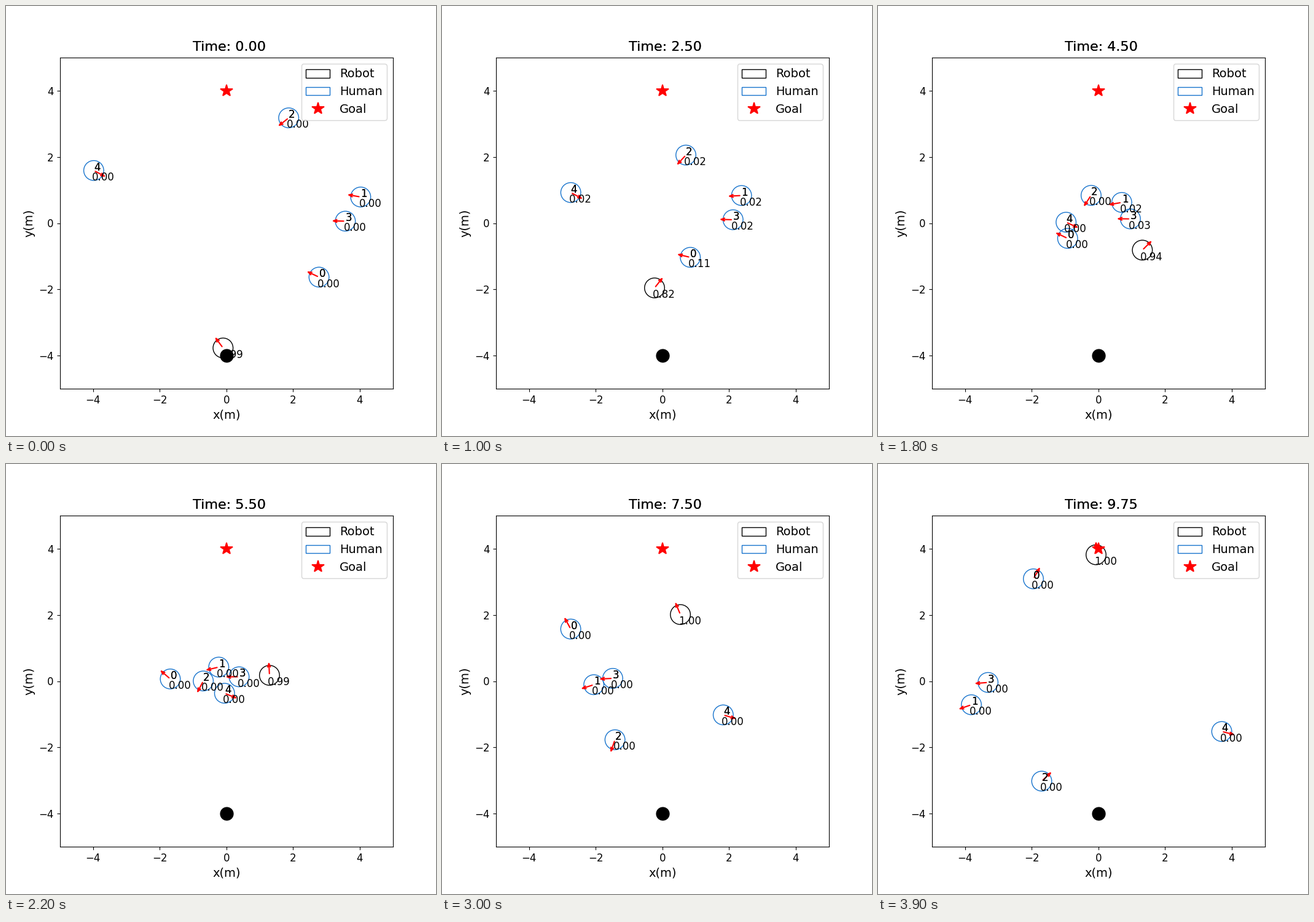
Recreate the animation shown at these times as a matplotlib script. Size 700x700 px, loop 4000 ms.

```python
import numpy as np
import matplotlib.pyplot as plt
from matplotlib.animation import FuncAnimation
from matplotlib.lines import Line2D
from matplotlib.patches import ArrowStyle, Circle, FancyArrowPatch

FRAMES, INTERVAL, STEP = 40, 100, 0.25
RADIUS, REACH = 0.3, 0.46
BLUE = "#1874cd"


def crossing(start, swerve, skew, then=None):
    """Route to the opposite side, bowed to the left by swerve metres.

    A skew above 1 puts the bow late; then is a stop after the far side.
    """
    start = np.array(start)
    along = -2 * start
    left = np.array([-along[1], along[0]]) / np.hypot(*along)
    q = np.linspace(0, 1, 200)[:, None]
    route = start + q * along + swerve * np.sin(np.pi * q**skew) * left
    return route if then is None else np.vstack([route, then])


class Walker:
    """Follows a route, at a slow pace up to the frame clear, then at a full one."""

    def __init__(self, route, slow, clear, full):
        self.route = np.array(route)
        legs = np.hypot(*np.diff(self.route, axis=0).T)
        self.length = np.r_[0, np.cumsum(legs)]
        self.slow, self.clear, self.full = slow, clear, full

    def point(self, walked):
        return np.array([np.interp(walked, self.length, c) for c in self.route.T])

    def at(self, frame):
        """Position and heading; everyone eases off shortly before the end."""
        t = frame - 0.3 * max(0, frame - 35)
        walked = self.slow * min(t, self.clear) + self.full * max(0, t - self.clear)
        front = np.clip(walked, 0.2, self.length[-1])
        dx, dy = self.point(front) - self.point(front - 0.2)
        return self.point(walked), np.arctan2(dy, dx)


robot = Walker([(-0.10, -3.77), (-0.52, -3.20), (-0.75, -3.12), (-0.80, -2.67),
                (-0.23, -1.95), (0.19, -1.76), (1.32, -0.84), (1.30, 0.16),
                (0.55, 1.99), (-0.07, 3.40), (-0.07, 3.87)], 0.2315, 12, 0.248)
humans = [
    Walker(crossing((2.78, -1.63), 0.87, 1.45, then=(-1.95, 3.09)), 0.161, 4, 0.232),
    Walker(crossing((4.03, 0.79), -0.48, 0.8), 0.166, 13, 0.238),
    Walker(crossing((1.87, 3.18), -0.62, 0.9, then=(-1.70, -3.02)), 0.162, 15, 0.24),
    Walker(crossing((3.57, 0.06), -0.13, 1.1), 0.145, 22, 0.234),
    Walker(crossing((-3.98, 1.59), -0.36, 1.05), 0.14, 10, 0.249),
]


def attention(frame, human):
    """Weight the robot gives a human: an early glance, more if near and ahead."""
    place, angle = robot.at(frame)
    dx, dy = human.at(frame)[0] - place
    ahead = max(0, np.cos(np.arctan2(dy, dx) - angle))
    glance = 0.018 * np.exp(-((frame - 10) / 7) ** 2)
    return glance + 0.2 * ahead**2 * np.exp(-(dx**2 + dy**2) / 1.6**2)


fig, ax = plt.subplots(figsize=(7, 7), dpi=100)
ax.tick_params(labelsize=12)
ax.set_xlim(-5, 5)
ax.set_ylim(-5, 5)
ax.set_xlabel("x(m)", fontsize=14)
ax.set_ylabel("y(m)", fontsize=14)

ax.add_artist(Line2D([0], [-4], color="black", marker="o", markersize=15))
goal = ax.add_artist(Line2D([0], [4], color="red", marker="*", markersize=15,
                            markeredgewidth=1.3, linestyle="None"))


class Figure:
    """Circle, heading arrow and labels of one walker."""

    def __init__(self, walker, color, name=None):
        self.walker = walker
        self.circle = ax.add_patch(Circle((0, 0), RADIUS, fill=False, edgecolor=color))
        # The number is laid down twice, which makes it look heavier.
        self.names = [ax.text(0, 0, name, fontsize=12) for _ in range(2 if name else 0)]
        self.score = ax.text(0, 0, "", fontsize=12)
        self.arrow = FancyArrowPatch((0, 0), (1, 1), color="red", zorder=1.5, linewidth=1.5,
                                     arrowstyle=ArrowStyle("->", head_length=4, head_width=1.6))
        ax.add_patch(self.arrow)

    def update(self, frame, score):
        (x, y), angle = self.walker.at(frame)
        self.circle.center = x, y
        self.arrow.set_positions((x, y), (x + REACH * np.cos(angle),
                                          y + REACH * np.sin(angle)))
        for label in self.names:
            label.set_position((x, y))
        self.score.set_position((x - 0.055, y - 0.3))
        self.score.set_text(f"{score:.2f}")


leader = Figure(robot, "black")
crowd = [Figure(human, BLUE, str(i)) for i, human in enumerate(humans)]
clocks = [ax.text(0.4, 1.02, "", fontsize=16, transform=ax.transAxes) for _ in range(2)]
ax.legend([leader.circle, crowd[0].circle, goal], ["Robot", "Human", "Goal"],
          fontsize=14, loc="upper right")


def draw(frame):
    scores = [attention(frame, human) for human in humans]
    leader.update(frame, 1 - sum(scores))
    for figure, score in zip(crowd, scores):
        figure.update(frame, score)
    for clock in clocks:
        clock.set_text(f"Time: {frame * STEP:.2f}")


anim = FuncAnimation(fig, draw, frames=FRAMES, init_func=lambda: draw(0),
                     interval=INTERVAL, repeat=True, repeat_delay=0)
plt.show()
```
